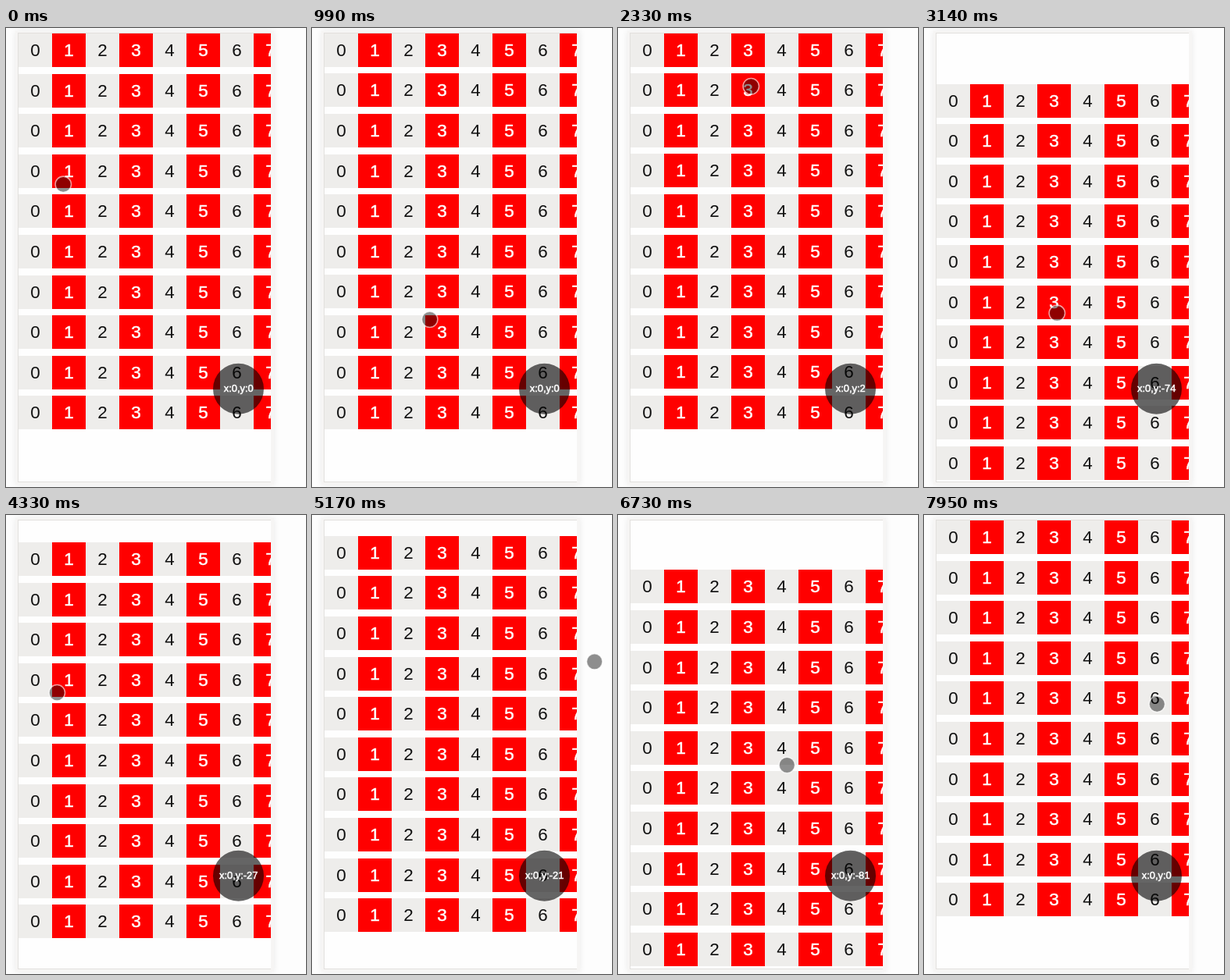
Animation of 384 by 588 pixels, one loop 8 s. Source, as an HTML page with a canvas:

```html
<!DOCTYPE html>
<html lang="en">
<head>
<meta charset="utf-8">
<title>Elastic scroll list</title>
<style>
html, body { margin: 0; width: 100%; height: 100%; overflow: hidden; background: #fdfdfd; }
canvas { display: block; width: 384px; height: 588px; }
</style>
</head>
<body>
<canvas id="stage" width="384" height="588"></canvas>
<script>
const ctx = document.getElementById('stage').getContext('2d');
const LOOP = 8000, SCALE = 0.86;
const PANEL = { x: 16, y: 7, w: 323, h: 574 };
const CELL = 50 * SCALE, PITCH = 60 * SCALE, ROWS = 10, COLS = 8;
const RESIST = 0.255, RETURN_TIME = 500;
const LIST_LAG = 28, LABEL_LAG = 50;
const FONT = '"Liberation Sans", Arial, sans-serif';

// Turning points of the finger: time, x, y
const path = [
  [0, 73, 200], [760, 150, 377], [940, 150, 377], [1570, 170, 85], [1800, 170, 11],
  [2500, 170, 109], [3140, 170, 365], [3320, 170, 372], [4140, 65, 102], [4330, 65, 227],
  [4385, 75, 245], [4960, 332, 150], [5400, 375, 260], [5860, 360, 392], [5900, 345, 410],
  [6400, 150, 162], [6650, 300, 393], [6730, 217, 321], [6950, 10, 140],
  [7420, 262, 268], [7950, 298, 242], [LOOP, 298, 242]
];

// The finger holds the list between these times
const drags = [
  { down: 940, up: 1820 },
  { down: 2500, up: 3380 },
  { down: 4140, up: 6950 }
];

// Monotone cubic interpolation along the path; axis 1 is x, 2 is y
function finger(t, axis) {
  const last = path.length - 1;
  let i = 0;
  while (i < last - 1 && t >= path[i + 1][0]) i++;
  const slope = k => (path[k + 1][axis] - path[k][axis]) / (path[k + 1][0] - path[k][0]);
  const tangent = k => {
    if (k === 0 || k === last) return 0;
    const a = slope(k - 1), b = slope(k);
    return a * b > 0 ? 2 * a * b / (a + b) : 0;
  };
  const h = path[i + 1][0] - path[i][0];
  const u = (t - path[i][0]) / h, v = 1 - u;
  return path[i][axis] * (1 + 2 * u) * v * v + path[i + 1][axis] * u * u * (3 - 2 * u)
    + h * u * v * (tangent(i) * v - tangent(i + 1) * u);
}

// Rubber band: follows the finger with resistance, then eases home
function listShift(t) {
  const drag = drags.filter(d => t >= d.down).pop();
  if (!drag) return 0;
  const pull = RESIST * (finger(Math.min(t, drag.up), 2) - finger(drag.down, 2));
  const p = Math.min(1, Math.max(0, t - drag.up) / RETURN_TIME);
  return pull * (1 - p * p * (3 - 2 * p));
}

function disc(x, y, r, fill) {
  ctx.beginPath();
  ctx.arc(x, y, r, 0, Math.PI * 2);
  ctx.fillStyle = fill;
  ctx.fill();
}

// White text gets a thin outline so that it looks a little heavier
function label(text, x, y, size, color) {
  ctx.font = `${size}px ${FONT}`;
  ctx.fillStyle = ctx.strokeStyle = color;
  ctx.fillText(text, x, y);
  if (color === '#fff') {
    ctx.lineWidth = 0.5;
    ctx.strokeText(text, x, y);
  }
}

function drawPanel() {
  const { x, y, w, h } = PANEL;
  ctx.fillStyle = '#fdfdfd';
  ctx.fillRect(0, 0, 384, 588);
  ctx.save();
  ctx.shadowColor = 'rgba(0,0,0,0.08)';
  ctx.shadowBlur = 8;
  ctx.fillStyle = '#f6f5f4';
  ctx.fillRect(x - 4, y - 3, w + 8, h + 7);
  ctx.restore();
  ctx.fillStyle = '#e2e0dd';
  ctx.fillRect(x - 1, y - 1, w + 1, h + 2);
  ctx.fillStyle = '#fefefe';
  ctx.fillRect(x, y, w, h);
}

function drawList(dy) {
  const { x, y, w, h } = PANEL;
  ctx.save();
  ctx.beginPath();
  ctx.rect(x, y, w, h);
  ctx.clip();
  for (let r = 0; r < ROWS; r++) {
    const top = Math.round(y + r * PITCH + dy);
    for (let c = 0; c < COLS; c++) {
      const left = x + c * CELL, odd = c % 2;
      ctx.fillStyle = odd ? '#ff0000' : '#eeedeb';
      ctx.fillRect(left, top, CELL, CELL);
      label(c, left + CELL / 2, top + 29, 22.4, odd ? '#fff' : '#111');
    }
  }
  ctx.restore();
}

function drawBubble(dy) {
  disc(297.5, 462.2, 32.5, 'rgba(0,0,0,0.6)');
  label(`x:0,y:${Math.round(-dy / SCALE)}`, 297.7, 466.2, 12.9, '#fff');
}

function drawTouch(x, y) {
  disc(x, y, 10, 'rgba(0,0,0,0.44)');
  ctx.beginPath();
  ctx.arc(x, y, 10.2, 0, Math.PI * 2);
  ctx.lineWidth = 1.6;
  ctx.strokeStyle = 'rgba(255,255,255,0.6)';
  ctx.stroke();
}

function draw(t) {
  ctx.textAlign = 'center';
  drawPanel();
  drawList(listShift(t - LIST_LAG));
  drawBubble(listShift(t - LABEL_LAG));
  drawTouch(finger(t, 1) + 0.3, finger(t, 2) + 0.3);
}

const start = performance.now();
function tick() {
  draw((performance.now() - start) % LOOP);
  requestAnimationFrame(tick);
}
tick();
</script>
</body>
</html>
```
